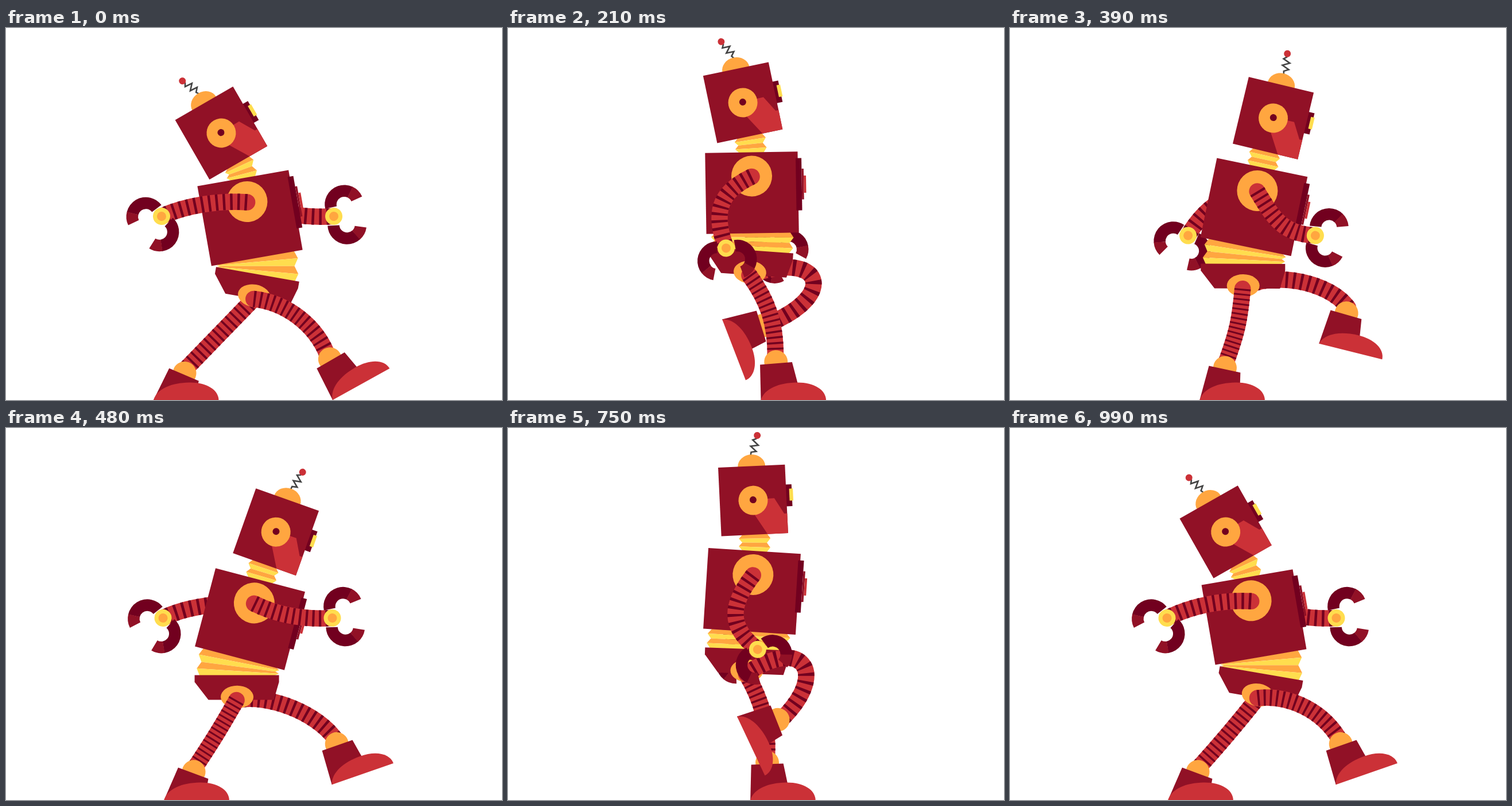
An HTML page with a canvas that plays this animation: 864 px wide and 648 px high, repeating every 1020 ms.

```html
<!DOCTYPE html>
<html lang="en">
<head>
<meta charset="utf-8">
<title>Walking robot</title>
<style>
html, body { margin: 0; height: 100%; overflow: hidden; background: #fff; }
canvas { display: block; width: 864px; height: 648px; }
</style>
</head>
<body>
<canvas id="stage" width="864" height="648"></canvas>
<script>
const ctx = document.getElementById('stage').getContext('2d');
const LOOP = 1020, STEP = 30, FLOOR = 648, RAD = Math.PI / 180;
const BODY = '#911126', RED = '#cb3137', DARK = '#72001f', ORANGE = '#ffa640', YELLOW = '#ffdd4e';
const { sin, cos, PI } = Math;

// A joint is a place with a rotation in degrees
const joint = (x, y, a) => ({ x, y, a });

function at(j, x, y) {
  const c = cos(j.a * RAD), s = sin(j.a * RAD);
  return [j.x + x * c - y * s, j.y + x * s + y * c];
}

function within(j, draw) {
  ctx.save();
  ctx.translate(j.x, j.y);
  ctx.rotate(j.a * RAD);
  draw();
  ctx.restore();
}

function poly(color, pts) {
  ctx.fillStyle = color;
  ctx.beginPath();
  pts.forEach(p => ctx.lineTo(p[0], p[1]));
  ctx.fill();
}

function rect(color, x, y, w, h) {
  ctx.fillStyle = color;
  ctx.fillRect(x, y, w, h);
}

function oval(color, x, y, rx, ry = rx) {
  ctx.fillStyle = color;
  ctx.beginPath();
  ctx.ellipse(x, y, rx, ry, 0, 0, 7);
  ctx.fill();
}

// Ringed hose from a to b, leaving at dir - bend and arriving at dir + bend
function hose(a, b, dir, bend, pull, rings) {
  const c = at(joint(...a, dir - bend), pull, 0);
  const d = at(joint(...b, dir + bend), -pull, 0);
  const spot = u => [0, 1].map(k => {
    const v = 1 - u;
    return v * v * v * a[k] + 3 * u * v * (v * c[k] + u * d[k]) + u * u * u * b[k];
  });
  let length = 0;
  for (let i = 0; i < 30; i++) {
    const p = spot(i / 30), q = spot((i + 1) / 30);
    length += Math.hypot(q[0] - p[0], q[1] - p[1]);
  }
  const pitch = length / rings;
  ctx.save();
  ctx.lineWidth = 28.5;
  ctx.beginPath();
  ctx.moveTo(...a);
  ctx.bezierCurveTo(...c, ...d, ...b);
  ctx.lineCap = 'round';
  ctx.strokeStyle = RED;
  ctx.stroke();
  ctx.lineCap = 'butt';
  ctx.strokeStyle = DARK;
  ctx.setLineDash([pitch * .35, pitch * .65]);
  ctx.stroke();
  ctx.restore();
}

function claw(side) {
  const x = 27.5 * cos(40.5 * RAD), y = side * 27.5 * sin(40.5 * RAD);
  const arc = (color, from, to) => {
    ctx.fillStyle = color;
    ctx.beginPath();
    ctx.arc(x, y, 34, side * from * RAD, side * to * RAD, side < 0);
    ctx.arc(x, y, 13.5, side * to * RAD, side * from * RAD, side > 0);
    ctx.fill();
  };
  arc(DARK, 56, 185);
  arc(BODY, 16, 57);
}

// Pendulum swing: the arm bends most when it hangs down
function drawArm(th, torso) {
  const c = cos(th), low = sin(th) ** 2;
  const hand = joint(421 - 150 * c, 357 - 29 * cos(2 * th + .25 * sin(2 * th)), 65 + 73 * c);
  hose(at(torso, 0, -28), [hand.x, hand.y], 90 + 80 * c, -14 - 31 * low, 48 + 18 * low, 12);
  within(hand, () => {
    claw(1);
    claw(-1);
    oval(YELLOW, 0, 0, 15);
    oval(ORANGE, 0, 0, 8);
  });
}

// First half of the cycle: the foot slides back on the floor
function stance(p) {
  const land = Math.max(0, 1 - 7 * p);
  return {
    x: 569 - 312 * p, y: FLOOR,
    sole: -29 * land,
    shaft: -24 + 47 * p - 6 * land,
    bend: 31 * (1 - p)
  };
}

// Second half: it lifts and swings forward, heel first
function lift(p) {
  const s = sin(PI * p), s2 = sin(2 * PI * p), ease = (1 - cos(PI * p)) / 2;
  const sole = 76 * s + 12 * s2 - 29 * ease;
  return {
    x: 257 + 312 * ease + 10 * s2 * s2, y: FLOOR - 146 * s,
    sole,
    shaft: sole + 4 * s + 23 * (1 - p) ** 8 - p,
    bend: 31 * p + 66 * s + 24 * s2
  };
}

function drawLeg(th, hip) {
  const p = th / PI % 2;
  const foot = p < 1 ? stance(p) : lift(p - 1);
  const shaft = joint(foot.x, foot.y, foot.shaft);
  const top = [hip.x - 1, hip.y + 5.5], ankle = at(shaft, 31.5, -74);
  const dir = Math.atan2(ankle[1] - top[1], ankle[0] - top[0]) / RAD;
  hose(top, ankle, dir, foot.bend, 56 + 60 * (foot.bend / 85) ** 6, 15.5);
  within(shaft, () => {
    oval(ORANGE, 31.5, -64, 20.5);
    poly(BODY, [[3.5, -61.5], [59.5, -61.5], [68, -14], [0, 0]]);
  });
  within(joint(foot.x, foot.y, foot.sole), () => {
    ctx.fillStyle = RED;
    ctx.beginPath();
    ctx.moveTo(0, 0);
    ctx.bezierCurveTo(6, -20, 32, -30, 62, -30.5);
    ctx.bezierCurveTo(92, -31, 113, -18, 113.5, 0);
    ctx.fill();
  });
}

// Folded strip between two edges, each given at half width w
function bellows(upper, uy, lower, ly, w, fold) {
  const row = i => {
    const half = w + (i % 2 ? fold : 0), u = i / 4;
    return [-half, half].map(x => {
      const p = at(upper, x, uy), q = at(lower, x, ly);
      return [p[0] + (q[0] - p[0]) * u, p[1] + (q[1] - p[1]) * u];
    });
  };
  for (let i = 0; i < 4; i++) {
    const [a, b] = row(i), [c, d] = row(i + 1);
    poly(i % 2 ? YELLOW : ORANGE, [a, b, d, c]);
  }
}

function drawAntenna() {
  ctx.strokeStyle = '#444';
  ctx.lineWidth = 2.6;
  ctx.beginPath();
  ctx.moveTo(0, 2);
  ctx.lineTo(-1, -4);
  for (let i = 0; i < 4; i++) ctx.lineTo(i % 2 ? -5 : 7, -8 - 5.7 * i);
  ctx.lineTo(0, -29);
  ctx.lineTo(0, -35);
  ctx.stroke();
  oval(RED, 0, -35, 6);
}

function drawHead() {
  oval(ORANGE, 0, -59, 24, 21);
  rect(DARK, 57, -25, 11, 38);
  rect(YELLOW, 63.5, -17.5, 6.5, 21);
  rect(BODY, -58.2, -59.8, 116.4, 119.6);
  poly(RED, [[0, 0], [5, -1.5], [37, -2], [53, 25.5], [58.2, 25.5], [58.2, 59.8], [22.5, 59.8], [2, 26]]);
  oval(ORANGE, 0, 0, 25.5);
  oval(DARK, 0, -1, 6);
}

function drawTorso() {
  rect(BODY, -80.6, -70.5, 161.2, 141);
  rect(DARK, 77, -59, 10, 91);
  rect(BODY, 87, -40.5, 3.5, 53.5);
  rect(RED, 90.5, -28.5, 4, 30);
  oval(ORANGE, 0, -29, 35.5);
}

function drawPelvis() {
  poly(BODY, [[-74, -38], [73, -38], [73, -26], [64, 5], [-50, 5], [-74, -26]]);
  oval(ORANGE, 0, 0, 28.5, 19.7);
}

function draw(th) {
  const c = cos(th), bob = cos(2 * th);
  const hip = joint(417.3 + 15 * c, 445.3 + 23 * bob - 1.8 * c, 10 * ((1 + c) / 2) ** 2);
  const torso = joint(425, 308.3 + 24.5 * bob - 1.8 * c, 2.5 - 12.5 * c);
  const neck = joint(...at(torso, -.7, -91.5), -5 - 25 * c);
  const head = joint(...at(neck, 0, -67), neck.a);
  const antenna = joint(0, -80, -32.5 * cos(th - 47 * RAD) - 5 * sin(3 * th));

  ctx.fillStyle = '#fff';
  ctx.fillRect(0, 0, 864, 648);
  drawArm(th + PI, torso);
  drawLeg(th + PI, hip);
  bellows(torso, 70, hip, -37.5, 65.5, 6.5);
  bellows(head, 59, torso, -70, 21.5, 6);
  within(hip, drawPelvis);
  within(torso, drawTorso);
  within(head, () => {
    within(antenna, drawAntenna);
    drawHead();
  });
  drawLeg(th, hip);
  drawArm(th, torso);
}

const start = performance.now();
function tick() {
  const t = (performance.now() - start) % LOOP;
  draw(Math.floor(t / STEP) * STEP / LOOP * 2 * PI);
  requestAnimationFrame(tick);
}
tick();
</script>
</body>
</html>
```
